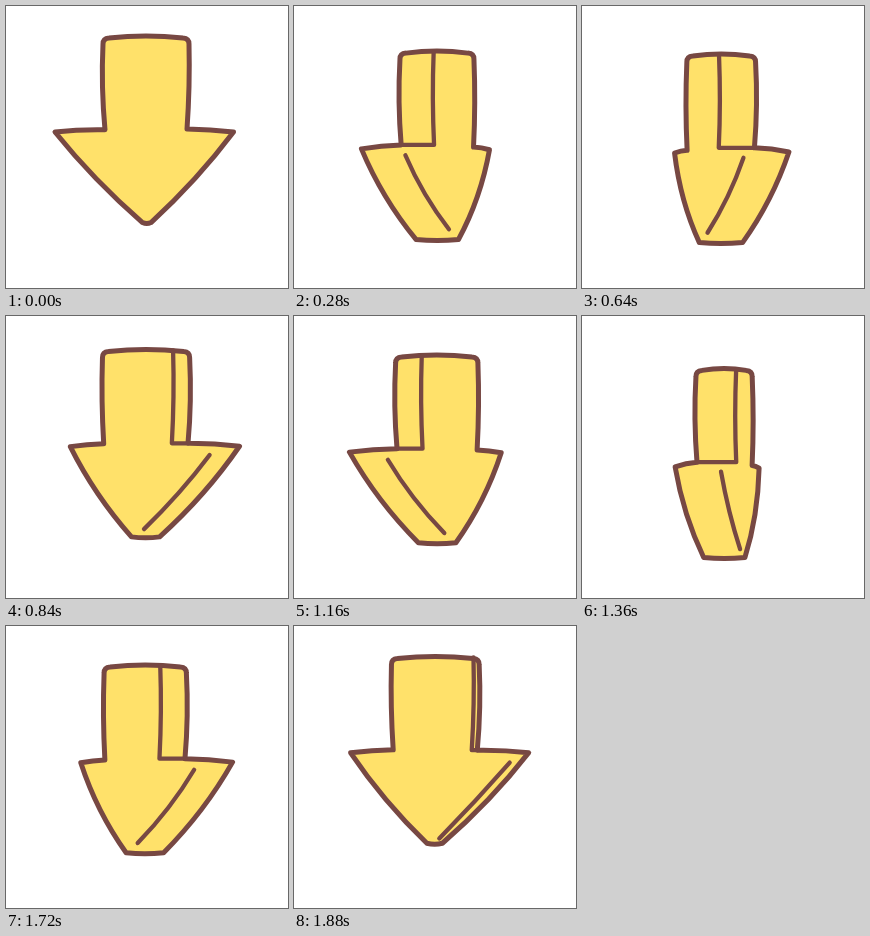
Recreate the animation shown at these times as an HTML page with a canvas. Size 282 by 282 pixels, loop 1920 ms.

```html
<!DOCTYPE html>
<html lang="en">
<head>
<meta charset="utf-8">
<title>Turning arrow</title>
<style>
  html, body { margin: 0; width: 100%; height: 100%; overflow: hidden; background: #fff; }
  canvas { display: block; width: 282px; height: 282px; }
</style>
</head>
<body>
<canvas id="stage"></canvas>
<script>
const LOOP = 1920, STEP = 40, SIZE = 282, CENTER = SIZE / 2;
const canvas = document.getElementById('stage');
const ctx = canvas.getContext('2d');
const ratio = window.devicePixelRatio || 1;
canvas.width = canvas.height = SIZE * ratio;

// Curve whose middle is moved by (bx, by) from the straight line
function bow(path, x1, y1, x2, y2, bx, by) {
  path.quadraticCurveTo((x1 + x2) / 2 + 2 * bx, (y1 + y2) / 2 + 2 * by, x2, y2);
}

// Arrow turned by 0 to 90 degrees, with its side showing on the left
function drawArrow(angle) {
  const cos = Math.cos(angle), sin = Math.sin(angle), half = Math.sin(2 * angle);
  // Offset from the center when face-on and edge-on, and perspective lean between
  const turn = (face, edge, lean) => CENTER + face * cos + edge * sin + lean * half;

  const back = turn(-44, -20.5, 8.3), fold = turn(-44, 20.5, 9.5), front = turn(42, 20.5, -3);
  const wingBack = turn(-92, -27, 4), wingFront = turn(86.5, 23, -17);
  const tipBack = turn(-4.5, -17.5, -2.5), tipFront = turn(4, 18, 7);
  const footX = back + 2 - sin, foldX = fold + 2 - 2 * sin, notchX = front - 2 + 2 * sin;

  const a = angle / (Math.PI / 2);
  const top = 32, shoulder = 123.8, notchY = 123 + 5 * a;
  const wingFrontY = 126 + 4.5 * a, wingBackY = 126 + 3 * a, tip = 216.6 + 3 * a;
  const bulge = 2.8 + half;

  const body = new Path2D();
  body.moveTo(footX, shoulder);
  bow(body, footX, shoulder, back, top + 6, -1.5, 0);
  body.quadraticCurveTo(back, top + 0.5, back + 6, top);
  bow(body, back + 6, top, front - 6, top, 0, -2);
  body.quadraticCurveTo(front, top + 0.5, front, top + 6);
  bow(body, front, top + 6, notchX, notchY, 1, 0);
  bow(body, notchX, notchY, wingFront, wingFrontY, 0, -0.5);
  bow(body, wingFront, wingFrontY, tipFront, tip, bulge * 0.9, bulge * 0.5);
  bow(body, tipFront, tip, tipBack, tip, 0, 1);
  bow(body, tipBack, tip, wingBack, wingBackY, -bulge * 0.9, bulge * 0.5);
  bow(body, wingBack, wingBackY, footX, shoulder, 0, -0.8);
  body.closePath();

  ctx.fillStyle = '#ffe16a';
  ctx.strokeStyle = '#774843';
  ctx.lineJoin = ctx.lineCap = 'round';
  ctx.lineWidth = 5;
  ctx.fill(body);
  ctx.stroke(body);
  if (half < 0.01) return; // face-on and edge-on views have no inner lines

  const folds = new Path2D();
  folds.moveTo(footX, shoulder);
  folds.lineTo(foldX, shoulder);
  bow(folds, foldX, shoulder, fold, top - 1, -1, 0);

  const x1 = turn(-79, 16, 6), y1 = 136.5 - 4 * a;
  const x2 = turn(-8, 17, 5.5), y2 = 213.5 - 5.5 * half;
  folds.moveTo(x1, y1);
  bow(folds, x1, y1, x2, y2, -2.5 * half, 1.3 * half);
  ctx.lineWidth = 4.3;
  ctx.stroke(folds);
}

function frame(now) {
  const t = Math.floor(now % LOOP / STEP) * STEP;
  const angle = t / LOOP * 2 * Math.PI % Math.PI;
  const flip = angle > Math.PI / 2;
  const bob = 24 * Math.sin(angle) ** 2;

  ctx.setTransform(ratio, 0, 0, ratio, 0, 0);
  ctx.fillStyle = '#fff';
  ctx.fillRect(0, 0, SIZE, SIZE);
  ctx.translate(flip ? SIZE : 0, bob);
  if (flip) ctx.scale(-1, 1);
  drawArrow(flip ? Math.PI - angle : angle);
  requestAnimationFrame(frame);
}
frame(performance.now());
</script>
</body>
</html>
```
